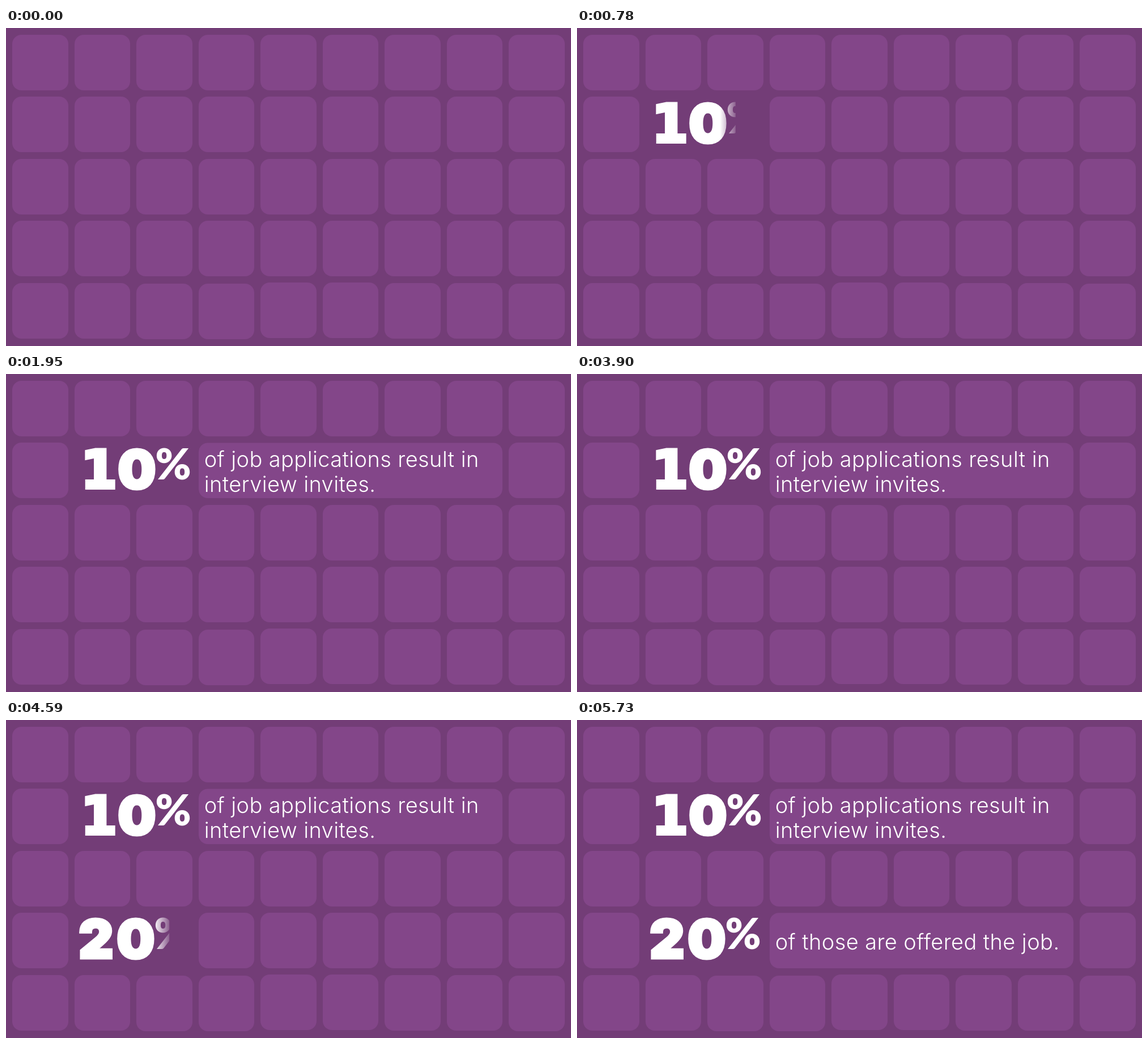
Animation, 997 px wide and 561 px high, one loop 8 s. Source, as an HTML page:

```html
<!DOCTYPE html>
<html lang="en">
<head>
<meta charset="utf-8">
<title>Application statistics</title>
<style>
html, body { margin: 0; width: 100%; height: 100%; overflow: hidden; background: #733d77; }
#stage { position: relative; width: 997px; height: 561px; overflow: hidden; background: #733d77; perspective: 2600px; }
.tile, .bar { position: absolute; background: #834689; border-radius: 16px; }
.tile { width: 98.5px; height: 98px; }
.bar { width: 536px; height: 98px; }
svg { position: absolute; left: 0; top: 0; overflow: visible; }
text { fill: #fff; }
.bar text { font: 300 38px Inter, sans-serif; letter-spacing: 0.4px; }
.number text { stroke: #fff; text-anchor: middle; }
.one { font: 700 92px "DejaVu Sans", sans-serif; stroke-width: 6px; }
.digit { font: 900 94px Inter, sans-serif; stroke-width: 5px; }
.percent { font: 900 76px Lato, sans-serif; stroke-width: 0; }
</style>
</head>
<body>
<div id="stage"></div>
<script>
const stage = document.getElementById('stage');
const PITCH = 109.5, ROW = 109.4, LOOP = 8000;
const LAST_ROW_SHIFT = [0, 0, 1, 1, -1, -1, 0, 0, 1];

const clamp = x => Math.max(0, Math.min(1, x));
const progress = (t, start, length) => clamp((t - start) / length);
const easeInOut = p => (1 - Math.cos(Math.PI * p)) / 2;
const easeOut = p => 1 - (1 - p) ** 2;

function add(className, left, top) {
  const el = document.createElement('div');
  el.className = className;
  el.style.left = left + 'px';
  el.style.top = top + 'px';
  stage.append(el);
  return el;
}

const tiles = [];
for (let r = 0; r < 5; r++) {
  tiles.push(LAST_ROW_SHIFT.map((shift, c) =>
    add('tile', 11 + PITCH * c, 12 + ROW * r + (r === 4 ? shift : 0))));
}

// glyphs: [class, character, centre x, baseline]; lines: [text, baseline]
function makeFact(start, row, glyphs, lines) {
  const bar = add('bar', 340, 12 + ROW * row);
  bar.innerHTML = '<svg width="536" height="98">' +
    lines.map(([s, y]) => `<text x="9.7" y="${y}">${s}</text>`).join('') + '</svg>';
  stage.insertAdjacentHTML('beforeend', '<svg class="number" width="997" height="561">' +
    glyphs.map(([cls, s, x, y]) => `<text class="${cls}" x="${x}" y="${y}">${s}</text>`).join('') + '</svg>');
  return { start, bar, number: stage.lastElementChild, text: bar.firstChild, row: tiles[row] };
}

const facts = [
  makeFact(0, 1,
    [['one', '1', 164, 201], ['digit', '0', 231, 201.5], ['percent', '%', 295, 186]],
    [['of job applications result in', 42.7], ['interview invites.', 86.7]]),
  makeFact(3780, 3,
    [['digit', '2', 159, 420], ['digit', '0', 229, 420], ['percent', '%', 293, 404]],
    [['of those are offered the job.', 64.7]])
];

function drawFact({ start, bar, number, text, row }, time) {
  const t = time - start;

  // two cards turn edge-on
  [1, 2].forEach(c => {
    const p = progress(t, -20 + 100 * c, 400);
    row[c].style.transform = p ? `rotateY(${90 * p}deg)` : 'none';
    row[c].style.visibility = p < 1 ? 'visible' : 'hidden';
  });

  // soft wipe across the number
  const edge = 252 + 0.28 * (t - 780);
  const mask = `linear-gradient(90deg, #000 ${edge}px, #0003 ${edge + 27}px, transparent ${edge + 28}px)`;
  number.style.visibility = t > 200 ? 'visible' : 'hidden';
  number.style.maskImage = number.style.webkitMaskImage = edge < 340 ? mask : 'none';

  // bar spreads from the middle card, then takes over from five cards
  const open = t >= 1710;
  const p = progress(t, 1710, 240);
  const half = open ? 227 + 41 * easeOut(p) : 49 + 12 * easeInOut(progress(t, 1060, 170));
  bar.style.visibility = t > 1060 ? 'visible' : 'hidden';
  bar.style.clipPath = `inset(0 ${268 - half}px round 16px)`;
  text.style.opacity = open ? 0.03 + 0.97 * p : 0;
  for (let c = 3; c < 8; c++) row[c].style.visibility = open ? 'hidden' : 'visible';
}

const origin = performance.now();
function frame() {
  const time = (performance.now() - origin) % LOOP;
  facts.forEach(fact => drawFact(fact, time));
  requestAnimationFrame(frame);
}
frame();
</script>
</body>
</html>
```
